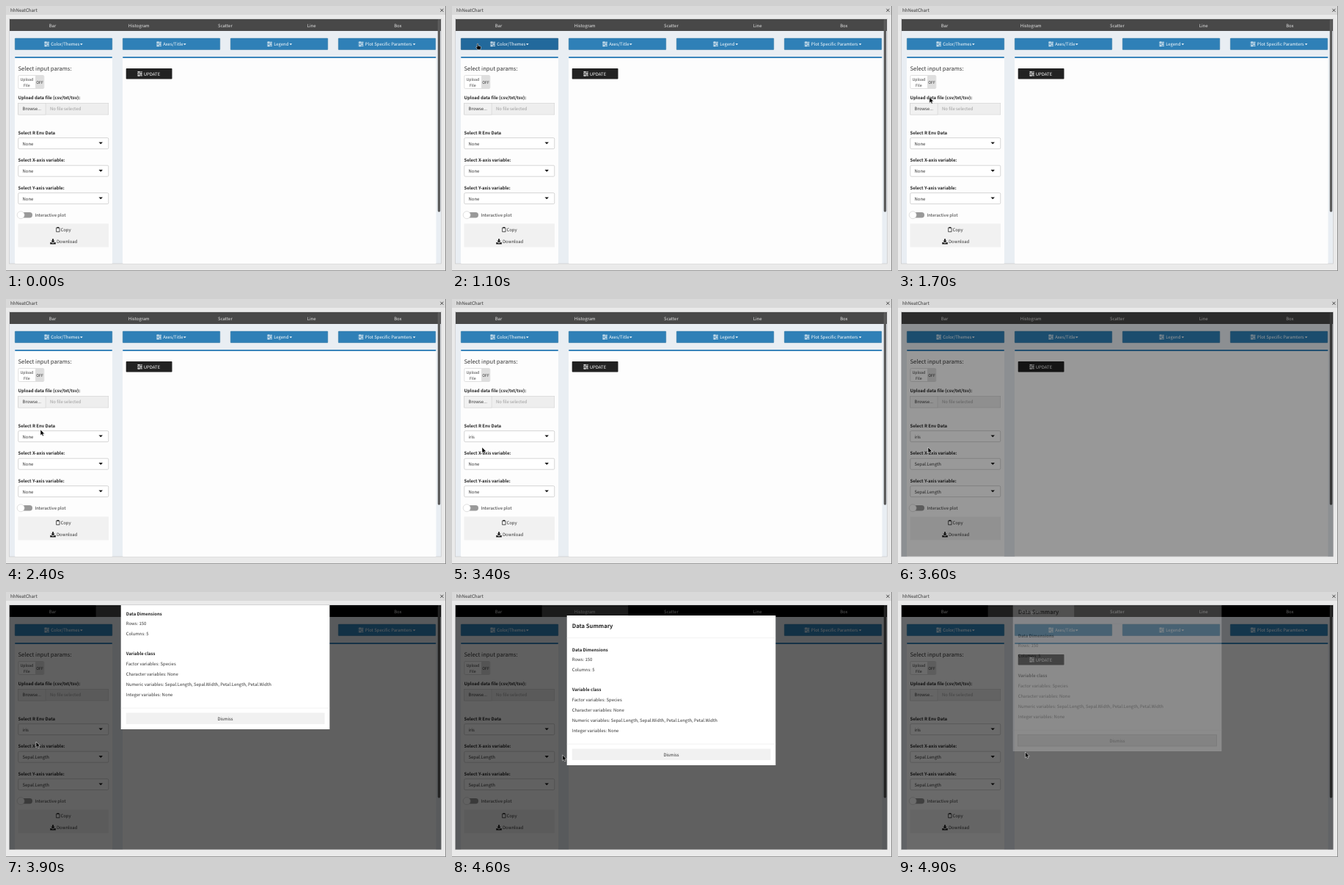
An HTML page for the animation above (5000 ms loop, 600 px wide and 361 px high).

```html
<!DOCTYPE html>
<html lang="en">
<head>
<meta charset="utf-8">
<style>
html, body { margin: 0; width: 100%; height: 100%; overflow: hidden; background: #e9e9e9; }
svg { display: block; width: 600px; height: 361px; }
text {
  font-family: "Noto Sans CJK JP", "Noto Sans CJK SC", "Noto Sans CJK", "Open Sans", sans-serif;
  text-rendering: geometricPrecision;
  white-space: pre;
}
</style>
</head>
<body>
<svg id="stage" viewBox="0 0 600 361"></svg>
<script>
const LOOP = 5000, STEP = 100;
const EM = 6.65, GLYPH_SCALE = 1.117;

const rect = (x, y, w, h, fill, extra = '') =>
  `<rect x="${x}" y="${y}" width="${w}" height="${h}" fill="${fill}" ${extra}/>`;
const label = (x, y, str, { size = EM, fill = '#333', extra = '' } = {}) =>
  `<text x="${x}" y="${y}" font-size="${size / GLYPH_SCALE}" fill="${fill}" ${extra}>${str}</text>`;
const bold = (x, y, str, size = EM) => label(x, y, str, { size, fill: '#222', extra: 'font-weight="700"' });
const centered = (x, y, str, opts = {}) => label(x, y, str, { ...opts, extra: 'text-anchor="middle"' });
const caret = (x, y, w, fill) => `<path d="M${x} ${y}h${w}l${-w / 2} ${w * 0.55}z" fill="${fill}"/>`;

// Three slider tracks with a knob on each
const sliders = (x, y) => `<g transform="translate(${x} ${y})" stroke="#fff">
  <path d="M0-2.4H7M0 0H7M0 2.4H7" stroke-width=".9"/>
  <path d="M2.2-3.4v2M5-1v2M2.2 1.4v2" stroke-width="1.3"/></g>`;

const menuButton = (x, iconX, caretX, str, id) =>
  rect(x + .25, 44, 132.5, 15.5, '#2f80b7', `id="${id}" stroke="#2a709f" stroke-width=".5" rx=".5"`) +
  sliders(iconX, 51.8) + label(iconX + 9.2, 54.2, str, { fill: '#fff' }) + caret(caretX, 51.3, 3.6, '#fff');

const panel = (x, w) =>
  rect(x, 69, w, 282, '#fdfdfd', 'rx="1"') + rect(x, 69, w, 2, '#3a85bb', 'rx="1"');

const selectBox = (y, title, id) =>
  bold(16.5, y - 5, title) +
  rect(16.75, y, 123, 15, '#fff', 'stroke="#bbb" stroke-width=".6" rx="1.5"') +
  label(22.5, y + 9.9, 'None', { extra: `id="${id}"` }) + caret(126.5, y + 5.8, 5.4, '#111');

const tabs = ['Bar', 'Histogram', 'Scatter', 'Line', 'Box'];

const windowFrame =
  rect(0, 0, 600, 361, '#eaeaea') + rect(0, 0, 600, 12, '#d9d9d9') +
  rect(599.2, 0, .8, 361, '#777') + rect(0, 360.2, 600, .8, '#888') +
  label(6, 8.2, 'hhNeatChart', { size: 6.9 }) +
  '<path d="M592.4 3.8l4 4m0-4l-4 4" stroke="#333" stroke-width=".9"/>' +
  rect(4.5, 17.5, 589, 333.5, '#e9eef3', 'stroke="#c4c4c4" stroke-width=".6"');

const navBar =
  rect(5, 18, 588, 16, '#484848') +
  `<g id="navShade">${rect(5, 18, 117.6, 16, '#000')}${rect(240.2, 18, 352.8, 16, '#000')}</g>` +
  tabs.map((name, i) => centered(63.5 + i * 117.7, 28.7, name, { fill: '#e6e6e6' })).join('');

const menus =
  menuButton(12, 52, 101, 'Color/Themes', 'themes') +
  menuButton(159, 205, 242, 'Axes/Title', 'axes') +
  menuButton(306, 356, 386.5, 'Legend', 'legend') +
  menuButton(453, 480.5, 554.8, 'Plot Specific Paramters', 'specific');

const sidebar =
  panel(12, 133) +
  label(16.5, 88.2, 'Select input params:', { size: 8.55 }) +
  rect(16.8, 94.5, 35, 18, '#fff', 'stroke="#ccc" stroke-width=".6" rx="1.5"') +
  rect(40, 94.8, 11.6, 17.4, '#dedede', 'rx="1"') +
  centered(28.3, 101.8, 'Upload', { size: 5.8 }) + centered(28.3, 109.8, 'File', { size: 5.8 }) +
  centered(46, 105.6, 'OFF', { size: 5.8 }) +
  bold(16.5, 127.2, 'Upload data file (csv/txt/tsv):') +
  rect(16.75, 132.3, 123, 15.7, '#eee', 'stroke="#ccc" stroke-width=".5"') +
  rect(16.75, 132.3, 37.3, 15.7, '#f1f1f1', 'stroke="#ccc" stroke-width=".5"') +
  label(22.5, 142.4, 'Browse...') + label(60, 142.4, 'No file selected', { fill: '#999' }) +
  selectBox(179.6, 'Select R Env Data', 'dataValue') +
  selectBox(217.2, 'Select X-axis variable:', 'xValue') +
  selectBox(254.6, 'Select Y-axis variable:', 'yValue') +
  rect(17, 281, 19, 7.4, '#999', 'rx="3.7"') +
  '<circle cx="20.2" cy="284.7" r="5" fill="#fff" stroke="#ccc" stroke-width=".6"/>' +
  label(39.5, 287, 'Interactive plot') +
  rect(16.5, 296.5, 123.5, 32, '#f1f1f1') +
  '<path d="M68.6 302h4.4v5.6h-4.4z" fill="none" stroke="#333" stroke-width=".8"/>' +
  rect(69.6, 301, 2.4, 1.8, '#333') + label(74.4, 307, 'Copy') +
  '<path d="M63 317.2h2v2.6h1.8l-2.8 2.8-2.8-2.8H63zM60.2 322h2l1.8 1.5 1.8-1.5h2v2.4h-7.6z" fill="#222"/>' +
  label(69, 323.4, 'Download');

const plotArea =
  panel(159, 427.5) + rect(163.7, 85, 62.8, 14.6, '#222', 'rx=".8"') +
  sliders(179, 92.4) + label(187.8, 94.9, 'UPDATE', { fill: '#fff' });

const dropdown = `<g id="dropdown">
  ${rect(16.75, 195, 123, 34, '#fff', 'stroke="#bbb" stroke-width=".6"')}
  ${rect(17, 197, 122.5, 15, '#f0f0f0', 'id="option"')}
  ${label(22.5, 207, 'iris')}${label(22.5, 222.5, 'None')}</g>`;

const modalLines = [
  [94.2, 'Rows: 150'], [108.4, 'Columns: 5'],
  [148.8, 'Factor variables: Species'], [163, 'Character variables: None'],
  [177.2, 'Numeric variables: Sepal.Length, Sepal.Width, Petal.Length, Petal.Width'],
  [191.4, 'Integer variables: None']
];
const modal = `<g clip-path="url(#view)"><g id="modal">
  ${rect(156.7, 32, 284.6, 204, '#fff')}
  ${rect(156.7, 62, 284.6, .5, '#e5e5e5')}${rect(156.7, 206.8, 284.6, .5, '#e5e5e5')}
  ${bold(163.7, 49.4, 'Data Summary', 8.55)}
  ${bold(163.7, 80.6, 'Data Dimensions')}${bold(163.7, 135, 'Variable class')}
  ${modalLines.map(([y, str]) => label(163.7, y, str)).join('')}
  ${rect(163.7, 213.6, 270.8, 15.4, '#f1f1f1', 'id="dismiss" stroke-width=".6"')}
  ${centered(299, 223.8, 'Dismiss')}</g></g>`;

const pointer = `<g id="pointer" stroke="#fff" stroke-width=".5" fill="#000">
  <path id="arrow" d="M0 0V7.8L1.8 6.2 3 8.8 4.4 8.2 3.3 5.7H5.7Z"/>
  <path id="hand" d="M-.8.6Q0-.4.8.6V3.2L4 4Q4.7 4.3 4.5 5.2L3.8 8.6H0L-2.5 5.2Q-2.4 4.2-.8 5.1Z"/></g>`;

stage.innerHTML = `<clipPath id="view">${rect(5, 18, 588, 332.5, '#000')}</clipPath>` +
  windowFrame + navBar + menus + sidebar + plotArea +
  rect(588.8, 18, 3.4, 262.5, '#5c5c5c', 'rx="1.5"') + dropdown +
  rect(4.6, 18, 588.8, 332.8, '#000', 'id="dim"') + modal + pointer;

const $ = id => document.getElementById(id);

// Key rows: [time, ...values]
const pointerPath = [
  [100, 185, 258], [200, 160, 132], [400, 160, 132], [700, 8, 24], [800, 5, 16],
  [1000, 34, 50], [1100, 35, 51], [1600, 42, 115], [2200, 47, 171], [2400, 47, 178],
  [2600, 47, 187], [2900, 47, 187], [3200, 41, 202], [3600, 41, 202], [3900, 41, 204],
  [4100, 47, 230], [4400, 105, 230], [4700, 173.5, 218]
];
const dimLevel = [[3400, 0], [3600, .4], [3700, .62], [4800, .62], [4900, .58]];
const modalPose = [
  [3700, 0, -51], [3900, 1, -49], [4000, 1, -16], [4100, 1, 0],
  [4700, 1, 0], [4800, .7, -5], [4900, .22, -19]
];

function sample(keys, t) {
  const i = keys.findIndex(k => k[0] > t);
  if (i === 0) return keys[0].slice(1);
  if (i < 0) return keys[keys.length - 1].slice(1);
  const a = keys[i - 1], b = keys[i], f = (t - a[0]) / (b[0] - a[0]);
  return a.slice(1).map((v, j) => v + (b[j + 1] - v) * f);
}

const show = (id, on) => $(id).setAttribute('visibility', on ? 'visible' : 'hidden');

function draw(t) {
  const [x, y] = sample(pointerPath, t);
  const [opacity, shift] = sample(modalPose, t);
  const overThemes = x > 12 && x < 145 && y > 44 && y < 60;
  const overDismiss = t >= 4200 && x > 164;

  $('pointer').setAttribute('transform', `translate(${x} ${y})`);
  show('arrow', t >= 100 && !overThemes);
  show('hand', overThemes);
  $('themes').setAttribute('fill', overThemes ? '#22699c' : '#2f80b7');
  $('themes').setAttribute('stroke', overThemes ? '#174c72' : '#2a709f');

  show('dropdown', t >= 2600 && t < 3400);
  show('option', t >= 3100 && t < 3400);
  $('dataValue').textContent = t >= 3400 ? 'iris' : 'None';
  $('xValue').textContent = $('yValue').textContent = t >= 3500 ? 'Sepal.Length' : 'None';

  $('dim').setAttribute('opacity', sample(dimLevel, t)[0]);
  show('navShade', t >= 3700);
  $('modal').setAttribute('opacity', opacity);
  $('modal').setAttribute('transform', `translate(0 ${shift})`);
  $('dismiss').setAttribute('fill', overDismiss ? '#dcdcdc' : '#f1f1f1');
  $('dismiss').setAttribute('stroke', overDismiss ? '#999' : 'none');
}

function tick() {
  draw(Math.floor(performance.now() % LOOP / STEP) * STEP);
  requestAnimationFrame(tick);
}
tick();
</script>
</body>
</html>
```
